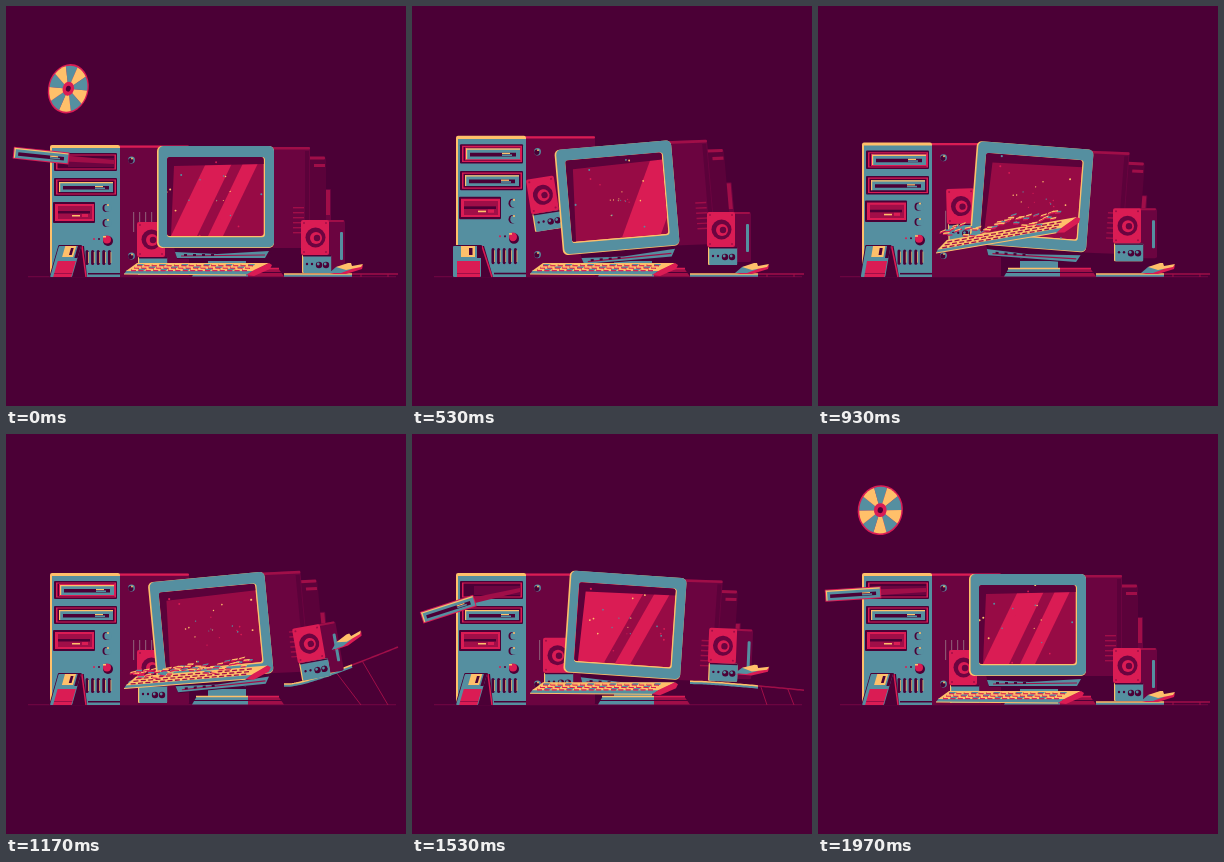
Animation, 400 px wide and 400 px high, one loop 2.01 s. Source, as an HTML page with a canvas:

```html
<!DOCTYPE html>
<html lang="en">
<head>
<meta charset="utf-8">
<title>Bouncing computer</title>
<style>
html, body { margin: 0; width: 100%; height: 100%; overflow: hidden; background: #4b0036; }
canvas { display: block; width: 400px; height: 400px; }
</style>
</head>
<body>
<canvas id="stage" width="400" height="400"></canvas>
<script>
const LOOP = 2010, FLOOR = 271;
const BG = '#4b0036', SHADE = '#5b023a', DIM = '#6b0440', MID = '#a00e48', RED = '#da1c54', TEAL = '#558fa0', GOLD = '#ffc06a';
const ctx = document.getElementById('stage').getContext('2d');

const rand = n => { const s = Math.sin(n * 127.1 + 3.7) * 43758.5453; return s - Math.floor(s); };
const rad = deg => deg * Math.PI / 180;

// Eased travel through a few [time, value] points, held at both ends.
function tween(t, ...keys) {
  const i = keys.findIndex(k => k[0] > t);
  if (i < 1) return keys.at(i)[1];
  const [t0, a] = keys[i - 1], [t1, b] = keys[i];
  return a + (b - a) * (1 - Math.cos(Math.PI * (t - t0) / (t1 - t0))) / 2;
}
// Height of a ballistic jump.
function hop(t, start, end, height) {
  const u = (t - start) / (end - start);
  return Math.max(0, 4 * u * (1 - u)) * height;
}

// The disc lands, everything is squashed, then springs back.
const bounce = t => tween(t, [190, 0], [330, -.2], [565, .085], [1100, 0]);
const sway = t => tween(t, [190, 0], [330, -4.4], [530, -4.9], [930, 4.4], [1170, -5.4], [1530, 3.9], [1850, 0]);
const matSlope = t => tween(t, [930, 0], [1170, -.42], [1530, .1], [1840, 0]);
const matLift = t => hop(t, 930, 1840, 23);
function matY(x, t) {
  const d = Math.max(0, x - 280);
  return 268 - matLift(t) + matSlope(t) * d * d / (d + 30);
}

function box(color, x, y, w, h, r = 0) {
  ctx.fillStyle = color;
  ctx.beginPath();
  ctx.roundRect(x, y, w, h, r);
  ctx.fill();
}
function path(p) {
  ctx.beginPath();
  for (let i = 0; i < p.length; i += 2) ctx.lineTo(p[i], p[i + 1]);
}
function poly(color, ...p) {
  path(p);
  ctx.fillStyle = color;
  ctx.fill();
}
function line(color, width, ...p) {
  path(p);
  ctx.strokeStyle = color;
  ctx.lineWidth = width;
  ctx.stroke();
}
function disc(color, x, y, r) {
  ctx.fillStyle = color;
  ctx.beginPath();
  ctx.arc(x, y, r, 0, 7);
  ctx.fill();
}
// Draws with the origin at a pivot, turned and stretched.
function place(x, y, deg, stretch, draw) {
  ctx.save();
  ctx.translate(x, y);
  ctx.rotate(rad(deg));
  ctx.scale(1, stretch);
  draw();
  ctx.restore();
}

function driveFace(x, y) {
  box(TEAL, x, y, 54, 10);
  box(GOLD, x, y, 54, 1.2);
  box(GOLD, x, y, 1.2, 10);
  box(BG, x + 4, y + 4, 46, 3.5);
  box(GOLD, x + 36, y + 4, 8, 1.2);
  box(TEAL, x + 36, y + 5.5, 10, 1.5);
}
function bay(y) {
  box(BG, 48, y, 63, 18, 1);
  box(RED, 50, y + 1.5, 60, 15);
  box(BG, 51.5, y + 2.5, 57, 13);
}

function drawTray(t) {
  const out = tween(t, [200, 1], [325, 0], [1390, 0], [1520, 1]);
  const angle = tween(t, [0, 6], [200, -8], [330, -5], [420, 0], [1380, 0], [1530, -18], [1650, 12], [1810, -7], [1960, -5], [2010, 6]);
  const x = 108 - 46 * out, y = 156 - angle * .6;
  if (out > .05) {
    box(DIM, 62, 152, 46, 9);
    poly(MID, x - 2, y - 3, 108, 154, 108, 158, x - 2, y + 3);
  }
  place(x, y, angle, 1, () => {
    box(RED, -55, -6, 56, 12);
    driveFace(-54, -5);
  });
}

function drawTower(t) {
  place(0, FLOOR, 0, 1 + bounce(t), () => {
    ctx.translate(0, -FLOOR);
    box(DIM, 112, 139.5, 71, 131.5, 2);
    box(RED, 113, 139.5, 70, 2.2, 1);
    for (const y of [154, 250]) {
      disc(TEAL, 125.5, y, 3.4);
      disc(BG, 124.8, y + .5, 2.6);
      disc(GOLD, 126, y - 1.5, .9);
    }
    for (let x = 127; x < 148; x += 6) box('#8a5270', x, 206, 1.2, 20);

    box(GOLD, 44, 139, 70, 132, 2);
    box(TEAL, 46, 142, 68, 129);
    bay(147);
    bay(172);
    driveFace(53, 176);
    box(BG, 47, 196, 42, 21, 1);
    box(RED, 49, 198, 39, 17);
    box(MID, 52, 200, 34, 13);
    box(BG, 52, 205, 32, 2.5);
    box(GOLD, 66, 209, 8, 1.5);
    box(RED, 76, 208, 6, 3);
    for (const y of [202, 217]) {
      disc(BG, 100.5, y, 4);
      disc(TEAL, 102, y, 3.7);
      disc(GOLD, 102, y - 3, 1);
    }
    disc(BG, 102, 235, 5);
    disc(RED, 101, 233.5, 4);
    box(GOLD, 97, 230, 3, 1.5);
    disc(RED, 88, 233, 1);
    disc(BG, 93, 233, 1);
    for (let x = 79.5; x < 106; x += 5.6) {
      box(BG, x, 244, 3, 15, 1.5);
      box(GOLD, x + 2.7, 246, .7, 11);
    }
    box(BG, 82, 267, 32, 1.5);
    drawTray(t);
  });
}

function drawStand() {
  box(TEAL, 202, 248, 38, 15);
  box(BG, 202, 253, 38, 2);
  poly(TEAL, 191, 262, 242, 262, 242, 270.5, 186, 270.5);
  poly(MID, 242, 262, 272, 262, 278, 270.5, 242, 270.5);
  line(GOLD, 1.5, 190, 262.5, 242, 262.5);
  line(RED, 1.5, 242, 262.5, 273, 262.5);
  line(BG, 1, 188, 266.5, 276, 266.5);
}

function drawMonitorSide(tilt) {
  ctx.save();
  ctx.translate(117, 1);
  ctx.transform(1, -Math.tan(rad(tilt)) / 2, 0, 1, 0, 0);
  box(DIM, 48, 42, 9, 53, 1);
  box(MID, 50, 43, 6, 25);
  box(SHADE, 34, 10, 18, 88, 2);
  box(MID, 34, 9.5, 17, 3, 1);
  box(MID, 40, 17, 11, 3);
  box(DIM, -6, 0, 42, 101, 2);
  box(MID, -6, 0, 42, 2.6, 1);
  box(SHADE, 31, 4, 4, 96);
  for (let y = 60; y < 90; y += 5) box(MID, 19, y, 11, 1.4);
  ctx.restore();
}

function drawScreen(t) {
  ctx.save();
  ctx.beginPath();
  ctx.roundRect(10, 11, 96.7, 79, 3);
  ctx.clip();
  box('#970b45', 10, 11, 97, 79);
  const tail = tween(t, [190, 14], [530, 60], [720, 115], [1200, -110], [1530, -36], [1970, 14]);
  const head = t < 900 ? tween(t, [190, 66], [530, 125]) : tween(t, [1200, -40], [1530, 66]);
  const streak = (from, to) => poly(RED, from, 90, to, 90, to + 38, 11, from + 38, 11);
  if (t < 720 || t > 1200) {
    streak(tail, Math.max(tail, head - 26));
    streak(Math.max(tail, head - 15), Math.max(tail, head));
  }
  poly(SHADE, 10, 11, 107, 11, 107, 18, 17, 20, 14, 90, 10, 90);
  for (let i = 0; i < 26; i++) {
    const a = rand(i) * 6.28, r = (rand(i + 40) + t / LOOP) % 1 * 58;
    disc(i % 3 ? (i % 2 ? GOLD : TEAL) : RED, 60 + r * Math.cos(a), 54 + r * Math.sin(a), .5 + r / 90);
  }
  ctx.restore();
}

function drawMonitor(t, front) {
  const b = bounce(t), tilt = sway(t);
  const dip = 30 * Math.max(0, -b) + .5 * Math.max(0, -tilt);
  place(208, 242 + dip, tilt, 1 + b / 2, () => {
    ctx.translate(-57, -102);
    if (!front) return drawMonitorSide(tilt);
    poly(BG, 17, 101, 116, 101, 111, 113, 20, 113);
    poly(TEAL, 18, 106, 60, 108, 112, 105, 108, 112, 20, 112);
    line(MID, 1.2, 24, 110, 108, 109);
    for (let x = 27; x < 60; x += 9) box(BG, x, 108, 3, 2);
    box(GOLD, 0, 0, 117, 102, 5);
    box(TEAL, 1.6, 0, 115.4, 101.3, 5);
    box(GOLD, 10, 11, 98, 80.2, 3);
    drawScreen(t);
  });
}

// Origin at the middle of the foot.
function drawSpeaker(boxed) {
  ctx.translate(-14, -53);
  if (boxed) {
    box(DIM, 24, 0, 20, 50, 2);
    box(MID, 26, 0, 17, 2, 1);
    box(TEAL, 39, 12, 3, 28, 1);
  }
  box(GOLD, 1, 35, 29, 18, 1);
  box(TEAL, 2.2, 35, 28, 18, 1);
  box(BG, 2, 35, 28, 1.5);
  disc(BG, 6, 44, 1.2);
  disc(BG, 11, 44, 1.2);
  for (const x of [18, 25]) {
    disc(BG, x, 45, 3.2);
    disc(TEAL, x - .8, 44, 1.4);
  }
  box(RED, 0, 0, 28, 35, 2);
  disc(DIM, 14.5, 17.5, 10);
  disc(RED, 15, 18, 6);
  disc(DIM, 16, 18, 3.2);
  for (const x of [3, 25]) for (const y of [3, 32]) disc(MID, x, y, 1);
}

function drawSpeakers(t, left) {
  const squash = 1 + Math.min(0, bounce(t));
  if (left) {
    const tilt = tween(t, [270, 0], [530, -9], [1080, 0]);
    const lift = hop(t, 300, 1080, 54) + hop(t, 1180, 1700, 14);
    place(145 + tilt, 269 - lift, tilt, squash, () => drawSpeaker(false));
  } else {
    const lift = hop(t, 380, 680, 8) + hop(t, 780, 1840, 24);
    place(309, 267 - lift, 24 * matSlope(t), squash, () => drawSpeaker(true));
  }
}

function drawMat(t) {
  const curve = (from, to, dy = 0) => {
    const p = [];
    for (let x = from; x <= to; x += 2) p.push(x, matY(x, t) + dy);
    return p;
  };
  for (const foot of [355, 382]) {
    const x = foot - matLift(t) / 2 + 40 * matSlope(t);
    line(MID, 1, x, matY(x, t), foot, FLOOR);
  }
  line(MID, 1.5, ...curve(346, 392));
  line(TEAL, 2.5, ...curve(278, 346, 1.5));
  line(GOLD, 1.5, ...curve(278, 346));
}

function drawMouse(t) {
  place(342, matY(342, t) - 6 - hop(t, 980, 1600, 25), 45 * matSlope(t), 1, () => {
    poly(RED, -10, 4, 15, -3, 14, 1, -2, 6, -18, 6);
    poly(TEAL, -19, 5, -12, -1, 0, -3, 4, 1, -7, 5);
    poly(GOLD, -12, -1, 0, -5, 3, -5, 4, -2, 15, -4, 13, -1, -2, 2);
  });
}

function drawKeyboard(t) {
  const rise = hop(t, 780, 1250, 24) + hop(t, 1300, 1640, 10);
  const loose = hop(t, 720, 1300, 13);
  place(118, 268 - rise, tween(t, [760, 0], [930, -10], [1400, 0]), 1, () => {
    ctx.translate(0, -11);
    poly(TEAL, 3, 7, 130, 7, 123, 12, 0, 11);
    poly(GOLD, 13, 0, 145, 0, 130, 8, 2, 8);
    poly(RED, 122, 12, 130, 7, 145, 0, 148, 2, 146, 6, 130, 13);
    line(GOLD, 1, 0, 11, 122, 12);
    for (let row = 0; row < 3; row++) for (let i = 0; i < 16; i++) {
      const n = row * 16 + i, x = 14 + i * 7.4 - row * 3, y = 1 + row * 2.4;
      const up = y - loose * (.7 + .4 * rand(n) + .25 * Math.sin(i * .8 + t / 130));
      const turn = loose * (rand(n + 70) - .5) * .25;
      box(MID, x - 1, y + .5, 5, 1.3);
      poly(n % 3 ? GOLD : TEAL, x, up, x + 6, up + turn, x + 5, up + 1.6 + turn, x - 1, up + 1.6);
      poly(RED, x - 1, up + 1.3, x + 4, up + 1.3 + turn, x + 4, up + 2.5 + turn, x - 1, up + 2.5);
    }
  });
}

function drawFloppy(t) {
  const lean = tween(t, [360, 1], [530, 0], [1250, 1]);
  const x = 41 + 12 * lean, foot = 41 + 3 * lean, w = 28 - 6 * lean;
  poly(BG, x + w - 3, 240, x + w + 3, 240, 81, FLOOR, foot + w - 2, FLOOR);
  line(RED, 1.5, x + w + 1, 240, 80, FLOOR);
  ctx.save();
  ctx.transform(w / 28, 0, (foot - x) / 31, 1, x, 240);
  box(BG, -1, -1, 30, 32, 1);
  box(TEAL, 0, 0, 28, 31, 1);
  box(RED, 4, 15, 23, 16);
  box(MID, 4, 27, 23, 1);
  box(GOLD, 8, 0, 14, 11);
  box(BG, 16, 2, 3.5, 7);
  box(BG, 24, 0, 4, 12);
  ctx.restore();
}

// Thrown up by the tray, it turns over and falls edge-on into the slot.
function drawDisc(t) {
  const u = t < 400 ? t + LOOP : t;
  if (u < 1610 || u > 2210) return;
  const y = 70 + (u < 1880 ? 85 * ((1880 - u) / 280) ** 2 : .00074 * (u - 1880) ** 2);
  const tilt = 15 + (u - LOOP) * (u < LOOP ? .175 : .3);
  place(62.3, y, tilt, 1, () => {
    ctx.scale(Math.max(.06, Math.cos(rad(36 + (u - LOOP) * .27))), 1);
    disc(RED, 0, 0, 25);
    for (let i = 0; i < 10; i++) {
      ctx.fillStyle = i % 2 ? TEAL : GOLD;
      ctx.beginPath();
      ctx.moveTo(0, 0);
      ctx.arc(0, 0, 23.3, rad(i * 36 - 8), rad(i * 36 + 28));
      ctx.fill();
    }
    disc(RED, 0, 0, 7);
    disc(BG, 0, 0, 3);
  });
}

function frame() {
  const t = (performance.now() - start) % LOOP;
  box(BG, 0, 0, 400, 400);
  box(DIM, 22, 270, 368, 1.2);
  drawTower(t);
  drawStand();
  drawMonitor(t, false);
  drawSpeakers(t, true);
  drawMonitor(t, true);
  drawMat(t);
  drawSpeakers(t, false);
  drawMouse(t);
  drawKeyboard(t);
  drawFloppy(t);
  drawDisc(t);
  requestAnimationFrame(frame);
}
const start = performance.now();
frame();
</script>
</body>
</html>
```
